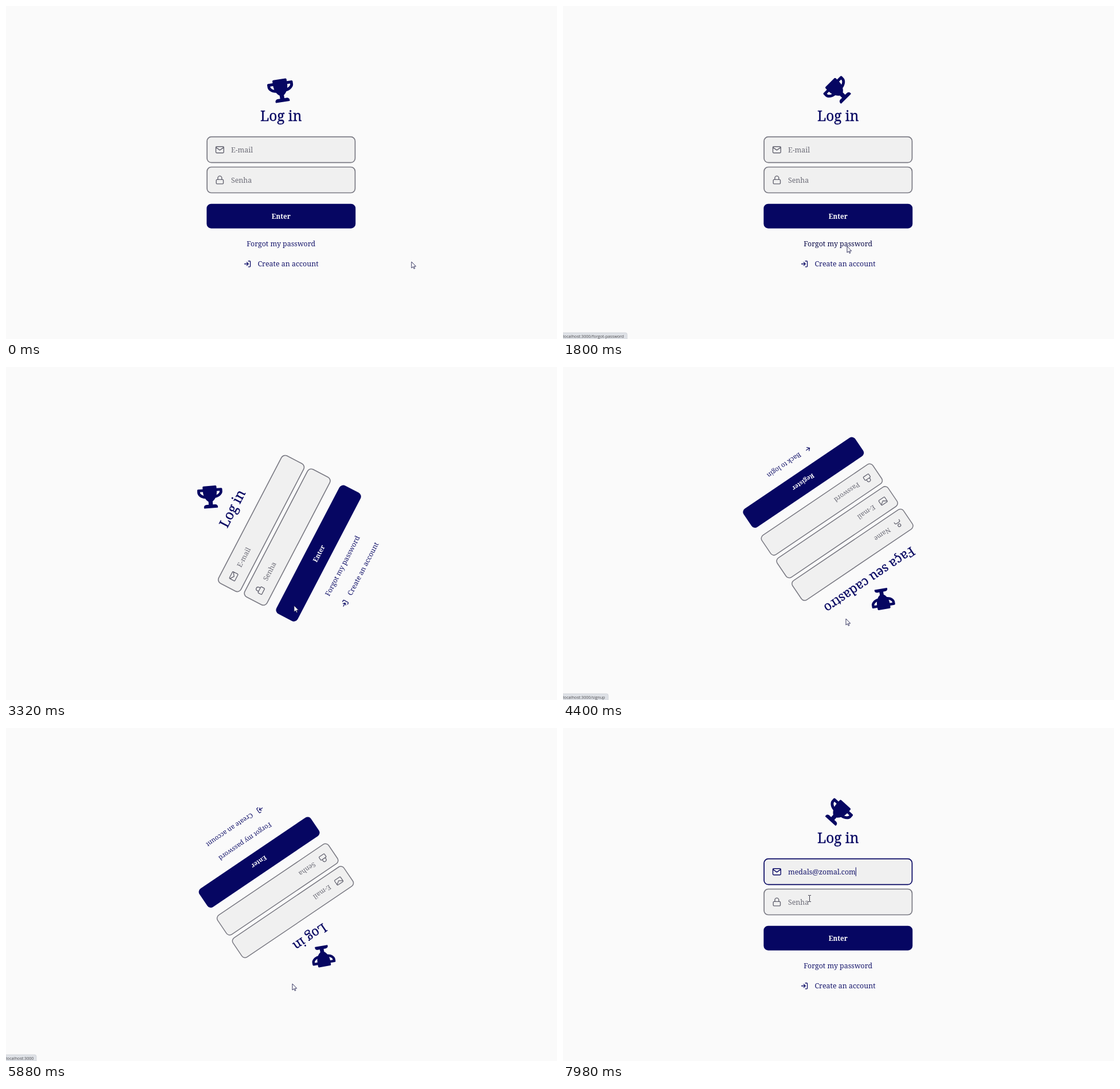
Write an HTML page that moves like this. It is 962x582 px and loops after 8000 ms.

```html
<!DOCTYPE html>
<html lang="en">
<head>
<meta charset="utf-8">
<title>Log in</title>
<style>
  html, body { margin: 0; width: 100%; height: 100%; overflow: hidden; background: #fafafa; }
  svg { display: block; width: 962px; height: 582px; }
  text { font-family: "Noto Serif", "Liberation Serif", serif; font-size: 12.4px; white-space: pre; }
  .title { font-size: 24.5px; font-weight: 500; fill: #060662; stroke: #060662; stroke-width: .3; text-anchor: middle; }
  .mid { text-anchor: middle; }
  .btn { font-size: 11.7px; font-weight: 700; fill: #fff; text-anchor: middle; }
  .hint { fill: #6b6b76; }
  .link { fill: #16166c; }
  .link.on { fill: #0a0a48; }
  .icon { fill: none; stroke: #62626f; stroke-width: 2; stroke-linecap: round; stroke-linejoin: round; }
  .link .icon { stroke: #12126a; stroke-width: 2.4; }
  .box { fill: #f0f0f0; stroke: #7a7a83; stroke-width: 1.7; }
  .focus .box { stroke: #060662; }
  .focus .icon { stroke: #060662; }
  #status text { font: 7.2px "Open Sans", "Noto Sans", sans-serif; fill: #4c4c50; }
</style>
</head>
<body>
<svg viewBox="0 0 962 582">
  <rect width="962" height="582" fill="#fafafa"/>
  <g id="stage"></g>
  <g id="status">
    <path fill="#dee1e6" stroke="#cfd2d7" stroke-width=".8"/>
    <text x="0" y="580.3"></text>
  </g>
  <circle id="click" r="7.5" fill="#f7f46c"/>
  <path id="arrow" d="M0 0V11L2.6 8.7 4.3 12.3 5.9 11.5 4.2 8.1H7.7Z" fill="#fff" stroke="#20204f" stroke-width=".9"/>
  <path id="beam" d="M-2.5-5.5H-.6L0-5 .6-5.5H2.5M0-5V5M-2.5 5.5H-.6L0 5 .6 5.5H2.5" fill="none" stroke="#3a3a48" stroke-width="1"/>
</svg>
<script>
const LOOP = 8000, NAVY = '#060662', CX = 480.4, CY = 291.5;
const SPIN_MS = 500, TURN_MS = 2000, MIN_SCALE = .84;
const EMAIL = 'medals@zomal.com';
const $ = s => document.querySelector(s);

const ICONS = {
  mail: 'M4 4h16a2 2 0 0 1 2 2v12a2 2 0 0 1-2 2H4a2 2 0 0 1-2-2V6a2 2 0 0 1 2-2zM22 6l-10 7L2 6',
  lock: 'M5 11h14a2 2 0 0 1 2 2v7a2 2 0 0 1-2 2H5a2 2 0 0 1-2-2v-7a2 2 0 0 1 2-2zM7 11V7a5 5 0 0 1 10 0v4',
  user: 'M20 21v-2a4 4 0 0 0-4-4H8a4 4 0 0 0-4 4v2M16 7a4 4 0 0 1-8 0 4 4 0 0 1 8 0z',
  enter: 'M15 3h4a2 2 0 0 1 2 2v14a2 2 0 0 1-2 2h-4M10 17l5-5-5-5M15 12H3',
  back: 'M19 12H5M12 19l-7-7 7-7'
};
const CUP = 'M552 64H448V24Q448 0 424 0H152Q128 0 128 24V64H24Q0 64 0 88V144C0 210 80 276 172 286 203 339 240 360 240 360V432H192C157 432 128 453 128 488V500Q128 512 140 512H436Q448 512 448 500V488C448 453 419 432 384 432H336V360S373 339 404 286C496 276 576 210 576 144V88Q576 64 552 64ZM99 193C75 175 64 156 64 144V128H128Q130 177 141 214 118 206 99 193ZM512 144C512 160 494 180 477 193Q458 206 435 214 446 177 448 128H512Z';

const icon = (name, x, y, size) =>
  `<path class="icon" transform="translate(${x - size / 2} ${y - size / 2}) scale(${size / 24})" d="${ICONS[name]}"/>`;

const field = ([name, label], y) => `<g class="field">
  <rect class="box" x="351" y="${y - 22.5}" width="258.5" height="45" rx="7.5"/>
  ${icon(name, 373.3, y, 16.5)}<text class="hint" x="393" y="${y + 4.7}">${label}</text></g>`;

const link = ([label, href, name, iconX], y) => `<g class="link" data-href="${href}">
  ${name ? icon(name, iconX, y, 13.5) : ''}
  <text class="mid" x="${name ? 492.5 : 480.2}" y="${y + 4.6}">${label}</text></g>`;

// Stacks a form vertically and centres it on the stage.
function form({ title, fields, button, links }) {
  const top = 148 - (fields.length - 2) * 26.4 - (links.length - 2) * 17.6;
  const first = top + 103.2, btn = first + fields.length * 52.8 + 10.4;
  return `<g class="cup" data-y="${top}"><path transform="scale(.0781) translate(-288 -256)" fill="${NAVY}" d="${CUP}"/></g>
    <text class="title" x="480.2" y="${top + 53.3}">${title}</text>
    ${fields.map((f, i) => field(f, first + i * 52.8)).join('')}
    <rect x="350.3" y="${btn - 21.5}" width="260" height="43" rx="8" fill="${NAVY}"/>
    <text class="btn" x="480.3" y="${btn + 5}">${button}</text>
    ${links.map((l, i) => link(l, btn + 48.4 + i * 35.2)).join('')}`;
}

const BACK = ['Back to login', '/', 'back', 437];
const FORMS = {
  login: {
    title: 'Log in', button: 'Enter',
    fields: [['mail', 'E-mail'], ['lock', 'Senha']],
    links: [['Forgot my password', '/forgot-password'], ['Create an account', '/signup', 'enter', 421.5]]
  },
  forgot: { title: 'Recuperar senha', button: 'Recover', fields: [['mail', 'E-mail']], links: [BACK] },
  signup: {
    title: 'Faça seu cadastro', button: 'Register',
    fields: [['user', 'Name'], ['mail', 'E-mail'], ['lock', 'Password']], links: [BACK]
  }
};

const VISITS = [[-1950, 'login'], [1960, 'forgot'], [2998, 'login'], [4266, 'signup'], [5746, 'login']];
const HOVERS = [[1560, 2160, '/forgot-password', 112], [2680, 3200, '/', 53], [3860, 4470, '/signup', 79], [5260, 5970, '/', 53]];
const CLICKS = [[1870, 1950], [2910, 2990], [4180, 4260], [5660, 5740], [6880, 6965]];
const MOVES = [
  [60, 708, 447], [820, 346, 422], [980, 346, 422], [1640, 496, 420], [2000, 496, 420], [2660, 502, 409],
  [3000, 503, 412], [3320, 503, 417], [3880, 494, 440], [4440, 494, 440], [5240, 500, 447],
  [6060, 500, 447], [6780, 439.5, 250.5], [7400, 439.5, 250.5], [7660, 433, 275], [7960, 430.5, 298]
];
const FOCUS_AT = 6966, TYPE_FROM = 7040, TYPE_TO = 7620;

const pages = {};
for (const name in FORMS) {
  const g = document.createElementNS('http://www.w3.org/2000/svg', 'g');
  g.innerHTML = form(FORMS[name]);
  $('#stage').append(g);
  const cup = g.querySelector('.cup');
  pages[name] = { g, cup, cupY: +cup.dataset.y, links: [...g.querySelectorAll('.link')] };
}
const mail = pages.login.g.querySelector('.field'), mailText = mail.querySelector('text');
mail.insertAdjacentHTML('beforeend', `<path class="caret" stroke="${NAVY}" stroke-width="1"/>`);
const caret = mail.querySelector('.caret');

const within = (list, t) => list.find(([a, b]) => t >= a && t < b);
const show = (el, on) => el.setAttribute('display', on ? 'inline' : 'none');
const place = (el, x, y) => el.setAttribute('transform', `translate(${x} ${y})`);

// CSS ease-out: cubic-bezier(0, 0, .58, 1)
function easeOut(x) {
  if (x >= 1) return 1;
  let lo = 0, hi = 1;
  for (let i = 0; i < 24; i++) {
    const u = (lo + hi) / 2;
    if (1.74 * u * u - .74 * u ** 3 < x) lo = u; else hi = u;
  }
  return 3 * lo * lo - 2 * lo ** 3;
}

function pointer(t) {
  const i = MOVES.findIndex(m => m[0] > t);
  if (i < 1) return (i ? MOVES[MOVES.length - 1] : MOVES[0]).slice(1);
  const [t0, x0, y0] = MOVES[i - 1], [t1, x1, y1] = MOVES[i];
  const k = (t - t0) / (t1 - t0), e = k * k * (3 - 2 * k);
  return [x0 + (x1 - x0) * e, y0 + (y1 - y0) * e];
}

function drawMail(t) {
  const focus = t >= FOCUS_AT;
  const k = Math.min(1, Math.max(0, (t - TYPE_FROM) / (TYPE_TO - TYPE_FROM)));
  const typed = EMAIL.slice(0, Math.ceil(k * EMAIL.length));
  mail.classList.toggle('focus', focus);
  mailText.textContent = typed || 'E-mail';
  mailText.setAttribute('class', typed ? 'link' : 'hint');
  show(caret, focus);
  const x = 393.5 + (typed ? mailText.getComputedTextLength() : 0);
  caret.setAttribute('d', `M${x} 243.5V259`);
}

function draw(t) {
  const [start, name] = VISITS.filter(v => v[0] <= t).pop();
  const age = t - start, p = easeOut(age / SPIN_MS), page = pages[name];
  const scale = MIN_SCALE + (1 - MIN_SCALE) * p;
  for (const n in pages) show(pages[n].g, n === name);
  page.g.setAttribute('transform',
    `translate(${CX} ${CY}) rotate(${-360 * (1 - p)}) scale(${scale}) translate(${-CX} ${-CY})`);
  page.cup.setAttribute('transform', `translate(480.2 ${page.cupY}) rotate(${age / TURN_MS * 360 % 360})`);

  const hover = within(HOVERS, t);
  for (const l of page.links) l.classList.toggle('on', !!hover && p === 1 && l.dataset.href === hover[2]);
  show($('#status'), hover);
  if (hover) {
    $('#status text').textContent = 'localhost:3000' + (hover[2] === '/' ? '' : hover[2]);
    $('#status path').setAttribute('d', `M-1 583V571H${hover[3] - 3}q3 0 3 3V583Z`);
  }
  if (name === 'login') drawMail(t);

  const [x, y] = pointer(t);
  const overField = name === 'login' && p === 1 && x > 350 && x < 610 && y > 228 && y < 327 && Math.abs(y - 277.5) > 3;
  show($('#beam'), overField);
  show($('#arrow'), !overField);
  show($('#click'), within(CLICKS, t));
  for (const id of ['#beam', '#arrow', '#click']) place($(id), x, y);
}

const begin = performance.now();
function tick() {
  draw((performance.now() - begin) % LOOP);
  requestAnimationFrame(tick);
}
tick();
</script>
</body>
</html>
```
